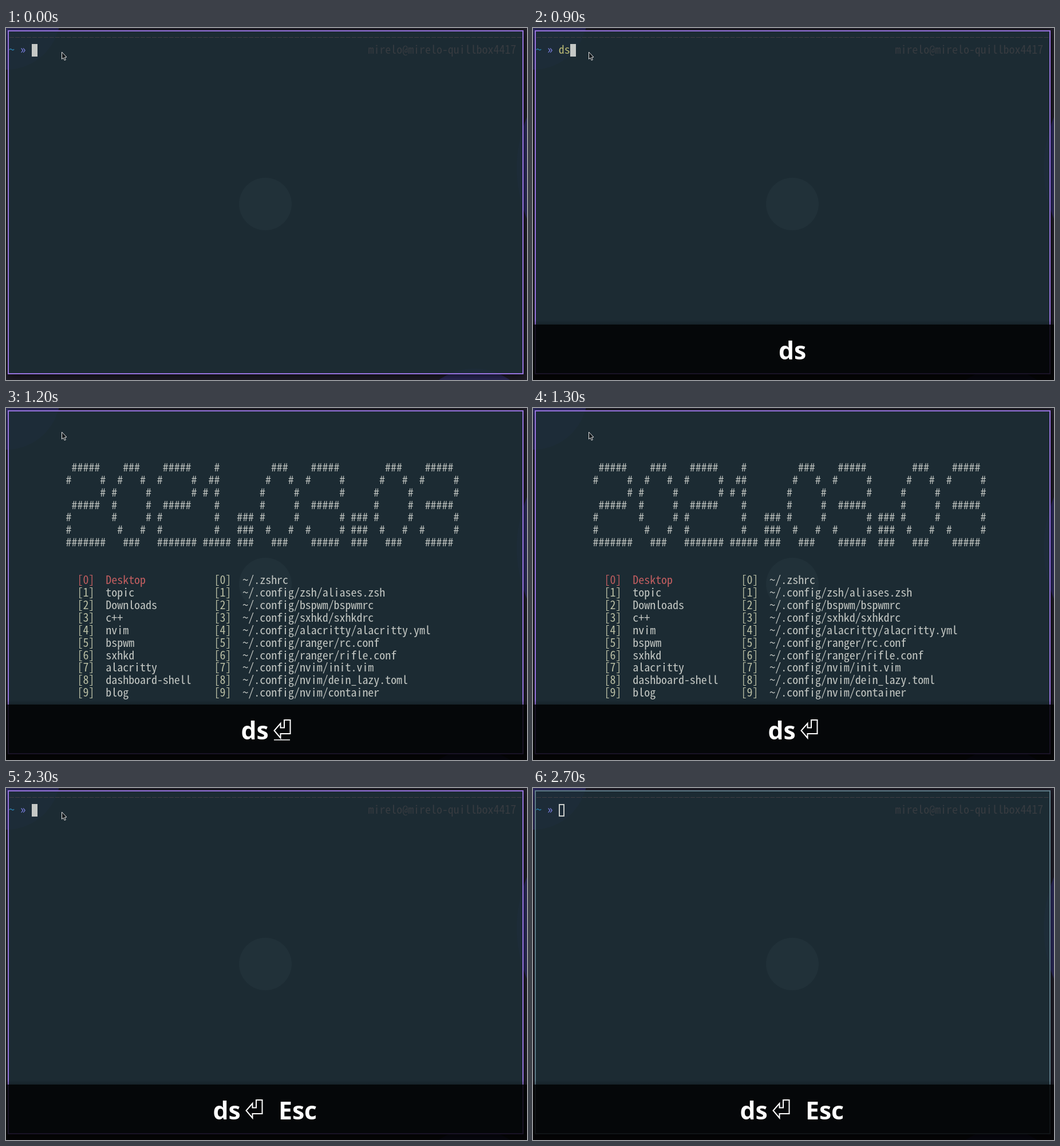
An HTML page with a canvas that plays this animation: 910x616 px, repeating every 3300 ms.

```html
<!DOCTYPE html>
<html lang="en">
<head>
<meta charset="utf-8">
<title>Dashboard shell</title>
<style>
html, body { margin: 0; width: 100%; height: 100%; overflow: hidden; background: #1f1d28; }
canvas { display: block; }
</style>
</head>
<body>
<canvas id="stage" width="910" height="616"></canvas>
<script>
const ctx = document.getElementById('stage').getContext('2d');
const LOOP = 3300, CELL = 9.96, ROW = 21.92, LEFT = 5;
const TEXT = '#c3c7c3', BRACKET = '#b9bea4', RED = '#c25e60';
const MONO = '"Noto Sans Mono CJK JP", "Noto Sans Mono CJK SC", "Noto Sans Mono", monospace';

// Choose the font size whose advance equals one terminal cell.
ctx.font = `100px ${MONO}`;
const monoFont = `${100 * CELL / ctx.measureText('0').width}px ${MONO}`;
const keyFont = 'bold 42.67px "Noto Sans", "Open Sans", sans-serif';

const GLYPHS = {
  0: '  ###  | #   # |#     #|#     #|#     #| #   # |  ###  ',
  1: '  #  | ##  |# #  |  #  |  #  |  #  |#####',
  2: ' ##### |#     #|      #| ##### |#      |#      |#######',
  3: ' ##### |#     #|      #| ##### |      #|#     #| ##### ',
  '.': '   |   |   |   |###|###|###'
};
const banner = [...'2021.03.03'].map(c => GLYPHS[c].split('|'));
const folders = ['Desktop', 'topic', 'Downloads', 'c++', 'nvim', 'bspwm', 'sxhkd',
  'alacritty', 'dashboard-shell', 'blog'];
const files = ['.zshrc', ...['zsh/aliases.zsh', 'bspwm/bspwmrc', 'sxhkd/sxhkdrc',
  'alacritty/alacritty.yml', 'ranger/rc.conf', 'ranger/rifle.conf', 'nvim/init.vim',
  'nvim/dein_lazy.toml', 'nvim/container'].map(f => '.config/' + f)];

function fill(color, x, y, w, h) {
  ctx.fillStyle = color;
  ctx.fillRect(x, y, w, h);
}

function circle(color, x, y, r) {
  ctx.fillStyle = color;
  ctx.beginPath();
  ctx.arc(x, y, r, 0, 7);
  ctx.fill();
}

function polygon(points, dx = 0) {
  ctx.beginPath();
  points.forEach(([x, y]) => ctx.lineTo(x + dx, y));
  ctx.closePath();
}

function put(text, col, row, color = TEXT) {
  ctx.font = monoFont;
  ctx.fillStyle = color;
  ctx.fillText(text, LEFT + col * CELL, 45 + (row - 1) * ROW);
}

function wallpaper(color) {
  circle(color, 0, -22, 95);
  circle(color, 1122, 245, 230);
  circle(color, 818, 702, 106);
}

function terminalWindow(focused) {
  fill('#1f1d28', 0, 0, 910, 616);
  wallpaper('#2c2a5c');
  ctx.save();
  ctx.shadowColor = 'rgba(0,0,0,.6)';
  ctx.shadowBlur = 14;
  ctx.shadowOffsetY = 4;
  fill('#1c2b33', 3, 4, 901, 602);
  ctx.restore();
  ctx.save();
  ctx.beginPath();
  ctx.rect(3, 4, 901, 602);
  ctx.clip();
  wallpaper('rgba(60,70,130,.06)');
  ctx.restore();
  circle('#213139', 453, 308, 46);
  ctx.lineWidth = 2;
  ctx.strokeStyle = focused ? '#9673de' : '#5d7a87';
  ctx.strokeRect(4, 5, 899, 600);
}

function prompt(t) {
  ctx.strokeStyle = '#403d42';
  ctx.lineWidth = 1;
  ctx.setLineDash([8, CELL - 8]);
  ctx.beginPath();
  ctx.moveTo(6, 16.5);
  ctx.lineTo(901, 16.5);
  ctx.stroke();
  ctx.setLineDash([]);
  put('~', 0, 1, '#2b86b5');
  put('»', 2, 1, '#7d80e6');
  put('mirelo@mirelo-quillbox4417', 63, 1, '#373b40');

  if (t >= 2700) {
    ctx.strokeStyle = '#c9cdca';
    ctx.lineWidth = 2;
    ctx.strokeRect(46, 29, 8, 20);
  } else if (t >= 800 && t < 900) {
    put('d', 4, 1, '#adb587');
    fill('#686a68', 55, 28, 10, 22);
    put('s', 5, 1, '#3c4547');
  } else {
    const typed = t >= 900 && t < 1200 ? 'ds' : '';
    put(typed, 4, 1, '#b9b873');
    fill('#c5c8c6', 45 + typed.length * 10, 28, 10, 22);
  }
}

function dashboard() {
  for (let r = 0; r < 7; r++) put(banner.map(g => g[r]).join(' '), 10, 4 + r);
  folders.forEach((name, i) => {
    const row = 13 + i;
    put(`[${i}]`, 12, row, i ? BRACKET : RED);
    put(name, 17, row, i ? TEXT : RED);
    put(`[${i}]`, 36, row, BRACKET);
    put('~/' + files[i], 41, row);
  });
}

function keyLabel(text, x, underlined) {
  ctx.font = keyFont;
  ctx.fillStyle = '#fff';
  ctx.fillText(text, x, 580);
  if (underlined) ctx.fillRect(x, 583, ctx.measureText(text).width, 2);
}

function enterKey(x, underlined) {
  ctx.strokeStyle = '#fff';
  ctx.lineWidth = 2;
  polygon([[19, 546], [29.5, 546], [29.5, 570], [12.5, 570], [12.5, 577.5],
    [1.5, 564.5], [12.5, 552], [12.5, 559.5], [19, 559.5]], x);
  ctx.stroke();
  if (underlined) fill('#fff', x + 1, 580, 28, 1.5);
}

function keyOverlay(t) {
  const shade = ctx.createLinearGradient(0, 511, 0, 519);
  shade.addColorStop(0, 'rgba(0,0,0,0)');
  shade.addColorStop(1, 'rgba(0,0,0,.2)');
  fill(shade, 0, 511, 910, 8);
  fill('rgba(0,0,0,.83)', 0, 519, 910, 97);
  if (t < 1100) {
    keyLabel('ds', 429, t < 900);
  } else if (t < 2200) {
    keyLabel('ds', 410.5, false);
    enterKey(467, t < 1300);
  } else {
    keyLabel('ds', 361.5, false);
    enterKey(418, false);
    keyLabel('Esc', 476, t < 2300);
  }
}

function pointer(t) {
  if (t >= 2700) return;
  if (t >= 2400) {
    fill('#ddd', 70, 0, 4, 10);
    fill('#ddd', 68, 9, 8, 4);
    fill('#111', 71.3, 0, 1.4, 11);
    fill('#111', 69, 10.5, 6, 1.4);
    return;
  }
  polygon([[97.5, 42], [97.5, 54.5], [100.3, 52.2], [102.3, 56.6], [104.3, 55.6],
    [102.4, 51.4], [106, 51]]);
  ctx.fillStyle = '#14191c';
  ctx.fill();
  ctx.strokeStyle = '#e4e4e4';
  ctx.lineWidth = 1;
  ctx.stroke();
}

function draw(t) {
  terminalWindow(t < 2700);
  if (t >= 1200 && t < 2200) dashboard();
  else prompt(t);
  if (t >= 800) keyOverlay(t);
  pointer(t);
}

const start = performance.now();
function tick() {
  draw((performance.now() - start) % LOOP);
  requestAnimationFrame(tick);
}
tick();
</script>
</body>
</html>
```
